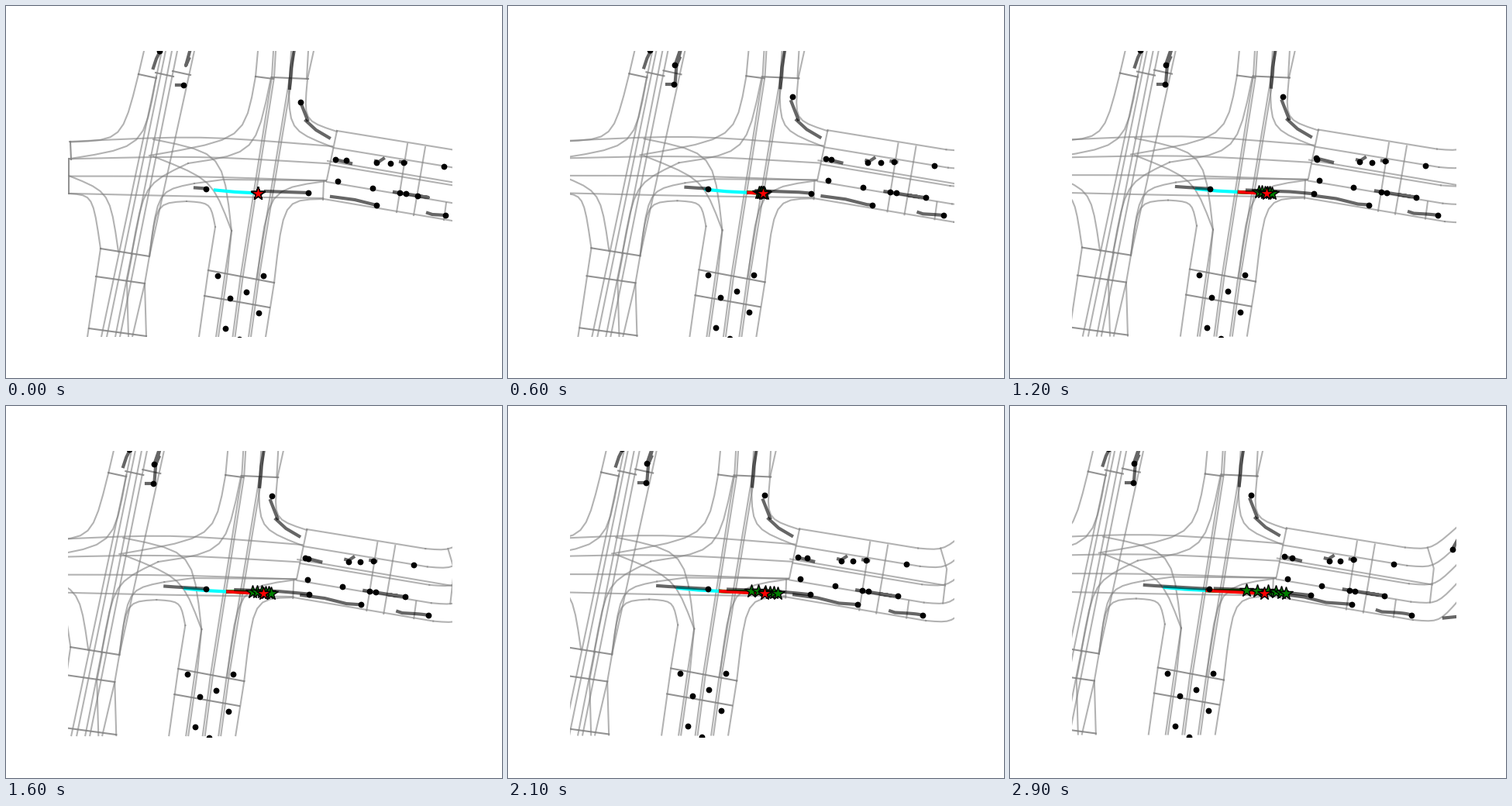
Write a matplotlib script that moves like this. It is 640 px wide and 480 px high and loops after 3000 ms.

```python
import numpy as np
import matplotlib.pyplot as plt
from matplotlib.animation import FuncAnimation

W, H, FRAMES = 640, 480, 30
T = np.arange(FRAMES)
RAMP = np.minimum(T / 6, 1)           # quick settling at the start
EASE = 1 - np.exp(-T / 12)            # slow stop
PAN_X, PAN_Y = 2.42, 0.12             # camera travel per frame, in pixels

fig = plt.figure(figsize=(W / 100, H / 100), dpi=100, facecolor="white")
ax = fig.add_axes([0.125, 0.11, 0.775, 0.77])
ax.axis("off")


def line(pts, **style):
    x, y = zip(*pts)
    return ax.plot(x, y, **style)[0]


def lane(*pts, alpha=0.6):
    line(pts, color="gray", alpha=alpha, lw=1.5, zorder=1)


def bar(a, b):
    lane(a, b, alpha=0.85)


def turn(a, corner, b):
    """Curve from a to b that hugs the corner, drawn in straight pieces."""
    u = np.linspace(0, 1, 9)[:, None]
    a, corner, b = map(np.array, (a, corner, b))
    lane(*(a * (1 - u) ** 3 + 3 * corner * u * (1 - u) + b * u ** 3))


def mix(a, b, u):
    return tuple(np.array(a) * (1 - u) + np.array(b) * u)


def trail(*pts):
    return line(pts, color="black", alpha=0.6, lw=3, zorder=4)


def dot(x, y):
    return ax.plot([x], [y], "o", color="black", ms=5.6, mew=0, zorder=5)[0]


def star(color, z):
    return ax.plot([], [], "*", mfc=color, mec="black", mew=1, ms=13, zorder=z)[0]


# West road
for top, bottom in [(201, 123), (206, 130), (214, 141), (221, 147)]:
    lane((top, 58), (bottom, 427))
lane((178, 58), (171, 88))
lane((243, 58), (185, 323), (179, 358), (181, 427))
lane((122, 313), (105, 427))
lane((163, 320), (156, 356), (158, 427))
lane((179, 358), (163, 427))
for k in range(3):
    bar((171 + 22 * k, 88 - 2 * k), (194 + 22 * k, 93 - 2 * k))
bar((122, 313), (185, 323))
bar((116, 349), (179, 358))
bar((107, 416), (181, 426))

# Middle road
for side in (-1.5, 1.5):
    for k in range(2):
        lane((346.5 + 23 * k + side, 58), (344.5 + 23 * k + side, 92),
             (304 + 21 * k + side, 350), (294 + 20.5 * k + side, 427))
    lane((291, 290), (284 + side, 346), (272.5 + side, 427))
lane((325, 58), (322, 91))
lane((390, 58), (388, 94))
lane((397, 58), (389, 94))
lane((270, 285), (261, 341), (249, 427))
lane((346, 357), (335, 427))
bar((322, 91), (345, 94))
bar((343, 92), (390, 94))
bar((261, 341), (346, 357))
bar((256, 374), (340, 389))

# East road, bending upwards at its far end
for k in range(5):
    a = mix((427, 161), (410, 249), k / 4)
    b = mix((580, 186), (590, 279.5), k / 4)
    lane(a, b)
    turn(b, (b[0] + 34, b[1] + 3), (650, 157 + 24 * k))
lane((415, 200), (615, 234))
lane((427, 161), (414, 224))
lane((410, 226), (409, 250))
lane((518, 178), (504, 266))
lane((541, 182), (526, 270))
lane((568, 254), (565, 276))
lane((609, 186), (617, 213), (612, 257))

# Carriageways across the junction
for k in range(4):
    a, b = (82, 175 + 22.3 * k), (421 - 4 * k, 181 + 22.3 * k)
    turn(a, (250, (a[1] + b[1]) / 2 - 11 + 4 * k), b)
bar((83, 175), (84, 198))
bar((81, 197), (81, 242))

# Turns: start, corner, end
turn((171, 88), (150, 173), (83, 175.5))
turn((194, 91), (178, 182), (83, 197))
turn((81, 242), (112, 244), (122, 313))
turn((81, 219), (134, 240), (145, 317))
turn((185, 323), (194, 254), (233, 252))
turn((233, 252), (264, 254), (270, 285))
turn((185, 323), (196, 238), (243, 229))
lane((243, 229), (280, 224), (413, 225))
turn((162, 320), (178, 230), (235, 203))
turn((235, 203), (322, 190), (342, 92))
turn((322, 91), (308, 172), (185, 193))
turn((190, 172), (280, 190), (291, 290))
turn((190, 194), (266, 224), (291, 290))
turn((409, 249), (358, 250), (346, 357))
turn((413, 226), (338, 236), (324, 352))
turn((389, 94), (384, 148), (427, 162))
turn((365, 93), (365, 160), (421, 182))

# Standing traffic
for p in [(273, 348), (332, 348), (310, 369), (289, 377), (326, 396), (283, 416),
          (301, 430), (197.5, 58), (229, 102), (424.5, 197.5), (496, 203),
          (513, 201.5), (565, 207), (428, 226), (472.5, 235), (508, 241),
          (515.5, 242), (641, 188.5)]:
    dot(*p)
trail((199, 58), (194, 68), (190, 80))
trail((220, 102), (229, 102))
trail((373, 50), (368, 80), (366, 106))
trail((380, 124), (389, 147))
trail((387, 148), (400, 160), (417, 170))
trail((477, 200), (481, 201), (487, 197))
trail((509, 201), (516, 202))
trail((425, 198), (445, 203))
trail((641, 188), (650, 172))
trail((630, 277), (650, 275))


class Mover:
    """A dot on a path over time; it leaves a trail if a start is given."""

    def __init__(self, x, y, *start):
        self.x, self.y = np.broadcast_arrays(x, y)
        self.start = start
        self.dot = dot(self.x[0], self.y[0])
        self.line = trail(*start) if start else None

    def update(self, n):
        self.dot.set_data([self.x[n]], [self.y[n]])
        if self.line:
            sx, sy = zip(*self.start)
            self.line.set_data(np.r_[sx, self.x[:n + 1]], np.r_[sy, self.y[:n + 1]])


movers = [
    Mover(258 + 2.4 * T, 235.5 + 0.14 * T, (244, 234.5)),
    Mover(390 + 2.7 * T - 0.0125 * T ** 2, 241 + 0.23 * T, (335, 239)),
    Mover(478 + 1.15 * T, 257 + 0.08 * T, (420, 246), (450, 250)),
    Mover(567 + 23 * EASE, 270 + 0.13 * T, (544, 267), (550, 269)),
    Mover(531 + 22.5 * RAMP, 245 + 3 * RAMP, (501, 240), (545, 247)),
    Mover(432 + 7 * np.cos(2 * np.pi * T / 24), 199),
    Mover(478 + 0.15 * T, 202 + 0.04 * T),
    Mover(240 - 10 * RAMP, 48 + 29 * RAMP, (236, 68), (232, 77)),
    Mover(380 + 1.5 * RAMP, 123.5 - 5.5 * RAMP),
]
queue_trail = trail((232, 77), (232, 77))

# Ego car: past track, driven track and candidate rollouts
START = (325, 241.5)
line([(270, 237.5), (296, 240), START], color="cyan", lw=3, zorder=2)


class Run:
    """A star that drives away from START, drawing its path behind it."""

    def __init__(self, color, speed, brake, slope, z):
        run = speed * T - brake * T ** 2
        self.x, self.y = START[0] + run, START[1] + slope * run
        self.line = line([START], color=color, lw=3, zorder=z)
        self.star = star(color, z + 4)

    def update(self, n):
        self.line.set_data(self.x[:n + 1], self.y[:n + 1])
        self.star.set_data([self.x[n]], [self.y[n]])


# The faster a candidate, the less it brakes
for speed in np.linspace(2.35, 3.5, 6):
    brake = 0.0215 * max(0, (2.9 - speed) / 0.55)
    movers.append(Run("green", speed, brake, 0.038 * (speed - 2.35), 2.5))
movers.append(Run("red", 3.25, 0.025, 0.055, 3))


def update(n):
    dx, dy = PAN_X * n, PAN_Y * n
    ax.set_xlim(80 + dx, 576 + dx)
    ax.set_ylim(427.2 + dy, 57.6 + dy)
    for m in movers:
        m.update(n)
    queue_trail.set_data([232, 232 - 2 * RAMP[n]], [77, 77 + 25 * RAMP[n]])
    return ax.lines


anim = FuncAnimation(fig, update, frames=FRAMES, interval=100, repeat=True,
                     repeat_delay=0, blit=False)
plt.show()
```
